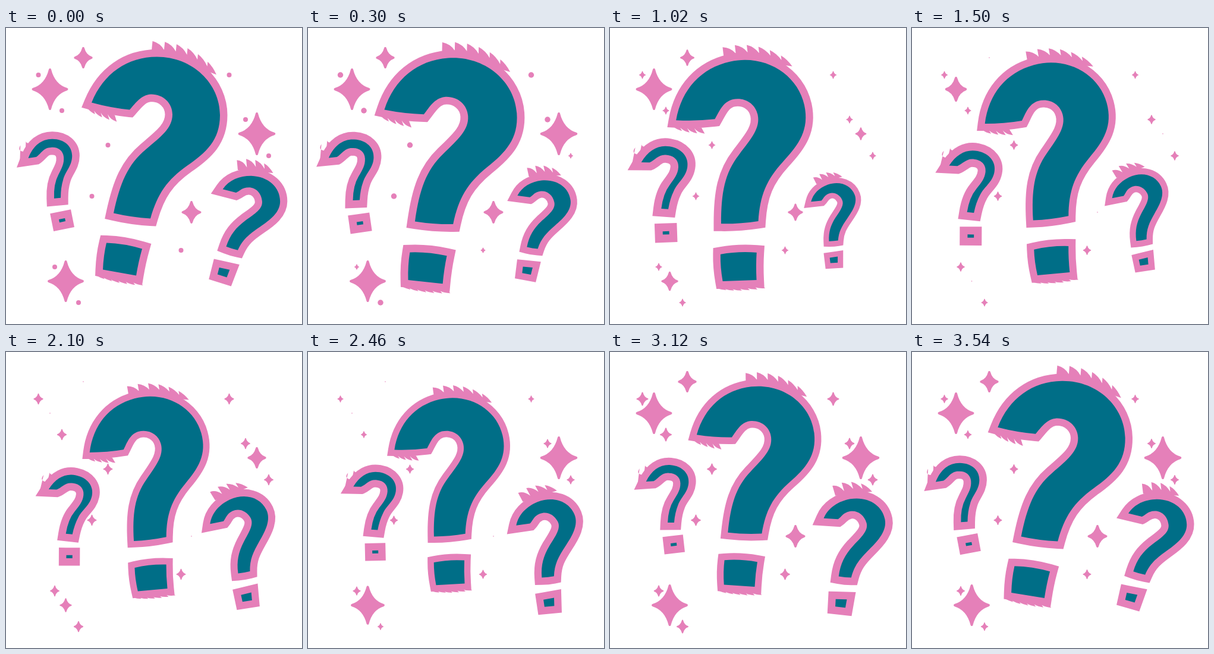
An HTML page with a canvas that plays this animation: 498x498 px, repeating every 3.6 s.

```html
<!DOCTYPE html>
<html lang="en">
<head>
<meta charset="utf-8">
<title>Question marks</title>
<style>
  html, body { margin: 0; width: 100%; height: 100%; overflow: hidden; background: #fff; }
  canvas { display: block; }
</style>
</head>
<body>
<canvas id="stage" width="498" height="498"></canvas>
<script>
const ctx = document.getElementById('stage').getContext('2d');
const LOOP = 3600, STEP = 60;
const PINK = '#e580b9', TEAL = '#006e87';
const { sin, cos, abs, min, max, PI } = Math;

// x, y and scale are harmonic series; swing is the widest turn in degrees.
// fur rows: start x, y, end x, y, bulge, spikes, length, lean.
const marks = [
  {
    shape: `M145 127C165 78 205 50 255 50C315 50 361 95 361 148C361 190 338 211 306 233
      C272 257 256 280 244 322Q212 320 182 313C193 262 206 231 236 206C262 184 281 170 281 147
      C281 128 266 113 245 113C228 114 219 128 209 139Q178 136 145 127Z
      M170 363Q200 364 230 373Q224 394 220 418L164 408Q165 384 170 363Z`,
    fur: [
      [246, 39, 355, 80, 14, 6, 15, 4],
      [184, 148, 138, 136, 2, 4, 10, 6],
      [228, 430, 153, 418, 3, 6, 4, 4]
    ],
    pivot: [262, 225],
    swing: -15.8,
    x: [257, 0, -7, 4, 0],
    y: [223.5, 0, 4.5, 0, 4.2],
    scale: [.945, .04, .08, .015, 0]
  },
  {
    shape: `M38 219C46 198 60 187 78 187C98 187 111 199 111 215C111 232 100 240 96 255
      Q92 268 92 285L81 286Q80 262 88 247C94 235 98 228 97 217C96 206 87 200 76 201
      C63 201 59 212 51 217ZM89 321L99 319L100 324L90 326Z`,
    fur: [[24, 224, 46, 194, 2, 2, 15, -22]],
    pivot: [88, 262],
    swing: 12,
    x: [102, -10, -11, -4, -2],
    y: [274.5, -12, 3, 0, 0],
    scale: [1.02, -.01, .045, 0, 0]
  },
  {
    shape: `M363 268C374 252 392 245 412 245C442 246 462 265 462 289C462 308 445 321 427 333
      C408 346 398 354 389 373Q379 371 369 367C376 346 386 334 402 322C419 310 432 302 431 289
      C430 275 420 265 408 265C396 265 393 271 386 274ZM357 403L375 407L370 420L354 415Z`,
    fur: [[389, 235, 450, 240, 8, 4, 17, 3]],
    pivot: [408, 338],
    swing: -27,
    x: [405, 2, -16, 1.5, 0],
    y: [334, 7.5, -5, -2, 2],
    scale: [.905, .03, -.13, .04, 0]
  }
];

// x, y, radius, middle and half length of the time it is hidden
const bigStars = [
  [74, 103, 35, 2160, 300],
  [422, 178, 36, 1500, 300],
  [100.5, 426, 35, 1600, 300],
  [130, 50, 18, 1980, 500],
  [312, 310, 19, 1980, 500]
];

// Small sparkles start as dots and turn into twinkling stars: x, y, twinkle
const smallStars = [
  { dotUntil: 900, items: [
    [54.5, 79, 3], [94, 139, 3], [375.5, 79, 3], [122, 462, 3],
    [171.5, 197, 1], [144.5, 283, 1], [403, 154, 1]
  ] },
  { dotUntil: 300, items: [[442, 215, 1], [294.5, 374, 1], [82, 402, 1]] }
];

const series = ([mid, a, b, c, d], w) =>
  mid + a * cos(w) + b * sin(w) + c * cos(2 * w) + d * sin(2 * w);

// A row of leaning spikes along a shallow arc, shrinking towards its end.
function furPath([x0, y0, x1, y1, bulge, count, length, lean]) {
  const d = Math.hypot(x1 - x0, y1 - y0);
  const ux = (x1 - x0) / d, uy = (y1 - y0) / d;
  const at = (p, out, along) => {
    const h = out + bulge * 4 * p * (1 - p), s = p * d + along;
    return [x0 + ux * s + uy * h, y0 + uy * s - ux * h];
  };
  const path = new Path2D();
  path.moveTo(x0, y0);
  for (let i = 0; i < count; i++) {
    const p = i / count, q = (i + 1) / count, k = 1 - .6 * p;
    path.lineTo(...at(p, length * k, -lean * k));
    path.quadraticCurveTo(...at((p + q) / 2, length * k * .8, 0), ...at(q, 0, 0));
  }
  path.closePath();
  return path;
}

for (const m of marks) {
  m.shape = new Path2D(m.shape);
  m.fur = m.fur.map(furPath);
}

function drawMark(m, w) {
  const scale = series(m.scale, w);
  ctx.save();
  ctx.translate(series(m.x, w), series(m.y, w));
  ctx.rotate(m.swing * sin(w / 2) * PI / 180);
  ctx.scale(scale, scale);
  ctx.translate(-m.pivot[0], -m.pivot[1]);
  ctx.lineWidth = 25;
  ctx.lineJoin = 'miter';
  ctx.fillStyle = PINK;
  m.fur.forEach(f => ctx.fill(f));
  ctx.stroke(m.shape);
  ctx.fillStyle = TEAL;
  ctx.fill(m.shape);
  ctx.restore();
}

function drawDot(x, y, r) {
  ctx.beginPath();
  ctx.arc(x, y, r, 0, 2 * PI);
  ctx.fill();
}

function drawStar(x, y, r) {
  const edge = min(2, r * .1), h = r - edge, v = r * .87 - edge, c = r * .19;
  ctx.beginPath();
  ctx.moveTo(x, y - h);
  ctx.quadraticCurveTo(x + c, y - c, x + v, y);
  ctx.quadraticCurveTo(x + c, y + c, x, y + h);
  ctx.quadraticCurveTo(x - c, y + c, x - v, y);
  ctx.quadraticCurveTo(x - c, y - c, x, y - h);
  ctx.closePath();
  ctx.lineWidth = edge * 2;
  ctx.lineJoin = 'round';
  ctx.stroke();
  ctx.fill();
}

function draw() {
  const t = Math.floor(performance.now() % LOOP / STEP) * STEP;
  const w = t / LOOP * 2 * PI;
  ctx.fillStyle = '#fff';
  ctx.fillRect(0, 0, 498, 498);
  ctx.fillStyle = ctx.strokeStyle = PINK;

  for (const [x, y, r, middle, half] of bigStars) {
    const away = min(abs(t - middle), LOOP - abs(t - middle));
    drawStar(x, y, max(1, r * min(1, (away - half) / 600)));
  }
  for (const { dotUntil, items } of smallStars)
    for (const [x, y, twinkle] of items) {
      const r = min(4 + t / 400, 8.5 + twinkle * cos(3 * w - 5 * PI / 4));
      (t < dotUntil ? drawDot : drawStar)(x, y, r);
    }
  for (const m of marks) drawMark(m, w);
  requestAnimationFrame(draw);
}
draw();
</script>
</body>
</html>
```
